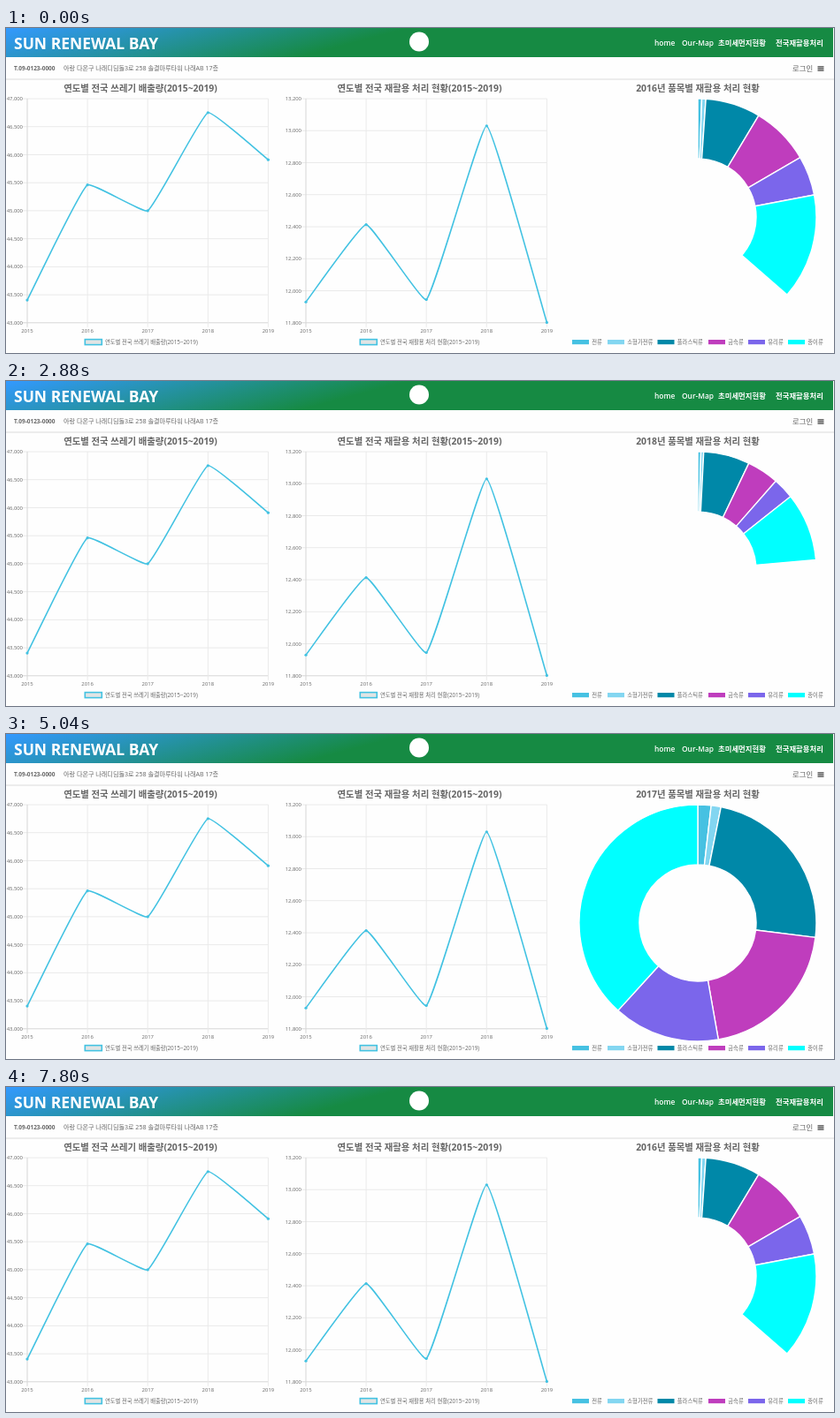
Animation of 936 by 368 pixels, one loop 7920 ms. Source, as an HTML page:

```html
<!DOCTYPE html>
<html lang="ko">
<head>
<meta charset="utf-8">
<title>Recycling dashboard</title>
<style>
  html, body { margin: 0; width: 100%; height: 100%; overflow: hidden; background: #fefefe; }
  #stage { position: absolute; left: 0; top: 0; width: 936px; height: 368px; overflow: hidden; }
  header { position: absolute; left: 0; top: 0; width: 935px; height: 33px;
    background: linear-gradient(165deg, #3399ff 0%, #168a43 43%, #168a43 100%); }
  svg { position: absolute; left: 0; top: 0; }
  text { font-family: "Open Sans", "Noto Sans CJK KR", "Noto Sans CJK", sans-serif; fill: #666; }
</style>
</head>
<body>
<div id="stage">
  <header></header>
  <svg id="view" width="936" height="368" viewBox="0 0 936 368"></svg>
</div>
<script>
const NS = "http://www.w3.org/2000/svg";
const view = document.getElementById("view");
const BLUE = "#42c2e2", GRID = "#eaeaea", AXIS = "#d6d6d6";

function add(tag, attrs, content) {
  const el = document.createElementNS(NS, tag);
  for (const key in attrs) el.setAttribute(key, attrs[key]);
  if (content !== undefined) el.textContent = content;
  return view.appendChild(el);
}

const label = (x, y, size, content, more) =>
  add("text", { x, y, "font-size": size, ...more }, content);
const line = (x1, y1, x2, y2, stroke, width = 1) =>
  add("line", { x1, y1, x2, y2, stroke, "stroke-width": width });
const title = (x, content) =>
  label(x, 72, 10.4, content, { "text-anchor": "middle", "font-weight": 700 });

// Page header
label(9, 24, 17.5, "SUN RENEWAL BAY", { "font-weight": 700, style: "fill:#fff" });
add("circle", { cx: 467, cy: 15.5, r: 11, fill: "#fff" });
[[733, "home"], [764, "Our-Map"], [805, "초미세먼지현황"], [870, "전국재활용처리"]]
  .forEach(([x, name]) => label(x, 20, 8.4, name, { "font-weight": 600, style: "fill:#fff" }));
label(9, 48, 6.5, "T.09-0123-0000", { "font-weight": 700 });
label(65, 48.3, 7.1, "아랑 다온구 나래디딤돌3로 258 솔결마루타워 나래AB 17층");
label(889, 49, 8.4, "로그인");
[43.9, 46, 48.1].forEach(y => line(917.5, y, 924.5, y, "#444", 1.3));
line(0, 58, 936, 58, "#dcdcdc");

// Smooth path through points, control arms along the neighbours' chord
function spline(pts, tension) {
  const arms = pts.map((p, i) => {
    const a = pts[i - 1] || p, b = pts[i + 1] || p;
    const da = Math.hypot(p[0] - a[0], p[1] - a[1]);
    const db = Math.hypot(b[0] - p[0], b[1] - p[1]);
    const at = k => [p[0] + k * (b[0] - a[0]), p[1] + k * (b[1] - a[1])];
    return { before: at(-tension * da / (da + db)), after: at(tension * db / (da + db)) };
  });
  return pts.map((p, i) => i
    ? `C${arms[i - 1].after} ${arms[i].before} ${p}`
    : `M${p}`).join("");
}

function lineChart({ left, max, min, step, values, name, titleX, legendX }) {
  const top = 80, bottom = 333.8, gap = 68.1, right = left + 4 * gap;
  const yOf = v => top + (max - v) / (max - min) * (bottom - top);
  title(titleX, name);
  for (let v = max; v >= min; v -= step) {
    line(left - 5, yOf(v), right, yOf(v), v === min ? AXIS : GRID);
    label(left - 5, yOf(v) + 2.1, 5.9, v.toLocaleString("en-US"), { "text-anchor": "end" });
  }
  for (let i = 0; i < 5; i++) {
    const x = left + i * gap;
    line(x, top, x, bottom + 5, i ? GRID : AXIS);
    label(x, 345, 5.9, 2015 + i, { "text-anchor": "middle" });
  }
  const pts = values.map((v, i) => [left + i * gap, yOf(v)]);
  add("path", { d: spline(pts, 0.1), fill: "none", stroke: BLUE, "stroke-width": 1.6 });
  pts.forEach(([cx, cy]) => add("circle", { cx, cy, r: 1.6, fill: BLUE }));
  add("rect", { x: legendX + 0.8, y: 352.6, width: 19, height: 6, fill: "#e2e4e4",
    stroke: BLUE, "stroke-width": 1.6 });
  label(legendX + 23.5, 357.8, 6.3, name);
}

lineChart({ left: 24, max: 47000, min: 43000, step: 500,
  values: [43405, 45460, 45000, 46750, 45910],
  name: "연도별 전국 쓰레기 배출량(2015~2019)", titleX: 152, legendX: 88.5 });
lineChart({ left: 339, max: 13200, min: 11800, step: 200,
  values: [11930, 12413, 11945, 13030, 11802],
  name: "연도별 전국 재활용 처리 현황(2015~2019)", titleX: 467.5, legendX: 399.5 });

// Doughnut
const kinds = [
  ["전류", "#46c1e2", 640], ["소형가전류", "#83d6f1", 680], ["플라스틱류", "#0088a8", 736.5],
  ["금속류", "#bf3dbd", 794], ["유리류", "#7b66eb", 839], ["종이류", "#00ffff", 884]
];
kinds.forEach(([name, fill, x]) => {
  add("rect", { x, y: 353, width: 19, height: 5.2, fill });
  label(x + 22.3, 357.8, 6.3, name);
});
const slices = kinds.map(([, fill]) =>
  add("path", { fill, stroke: "#fff", "stroke-width": 1.4, "stroke-linejoin": "round" }));
const yearTitle = title(782, "");

// Slice ends in degrees; start is counted in ticks
const years = [
  { year: 2016, start: -0.87, ends: [5.3, 10.8, 84.9, 164.2, 217.7, 360] },
  { year: 2017, start: 7.19, ends: [6.5, 11.3, 97, 170, 222.3, 360] },
  { year: 2018, start: 23.47, ends: [6.5, 12.2, 108, 174.4, 218.2, 360] }
];
const TICK = 120, TICKS = 66, GROW = 0.123;
const CX = 782, CY = 214, OUTER = 134, INNER = 66;

function polar(r, deg) {
  const a = deg * Math.PI / 180;
  return `${(CX + r * Math.sin(a)).toFixed(2)} ${(CY - r * Math.cos(a)).toFixed(2)}`;
}

function ring(from, to) {
  const big = to - from > 180 ? 1 : 0;
  return `M${polar(OUTER, from)}A${OUTER} ${OUTER} 0 ${big} 1 ${polar(OUTER, to)}` +
    `L${polar(INNER, to)}A${INNER} ${INNER} 0 ${big} 0 ${polar(INNER, from)}Z`;
}

let shown = -1;
function draw(now) {
  const tick = Math.floor(now / TICK) % TICKS;
  const pos = Math.min(tick, TICKS - 1 - tick); // forward, then back again
  if (pos !== shown) {
    shown = pos;
    const data = years.filter(y => y.start <= pos).pop();
    const p = Math.min(1, (pos - data.start) * GROW);
    const grown = 1 - (1 - p) ** 4;
    yearTitle.textContent = `${data.year}년 품목별 재활용 처리 현황`;
    slices.forEach((slice, i) =>
      slice.setAttribute("d", ring((data.ends[i - 1] || 0) * grown, data.ends[i] * grown)));
  }
}

const begin = performance.now();
function loop() {
  draw(Math.max(0, performance.now() - begin));
  requestAnimationFrame(loop);
}
loop();
</script>
</body>
</html>
```
